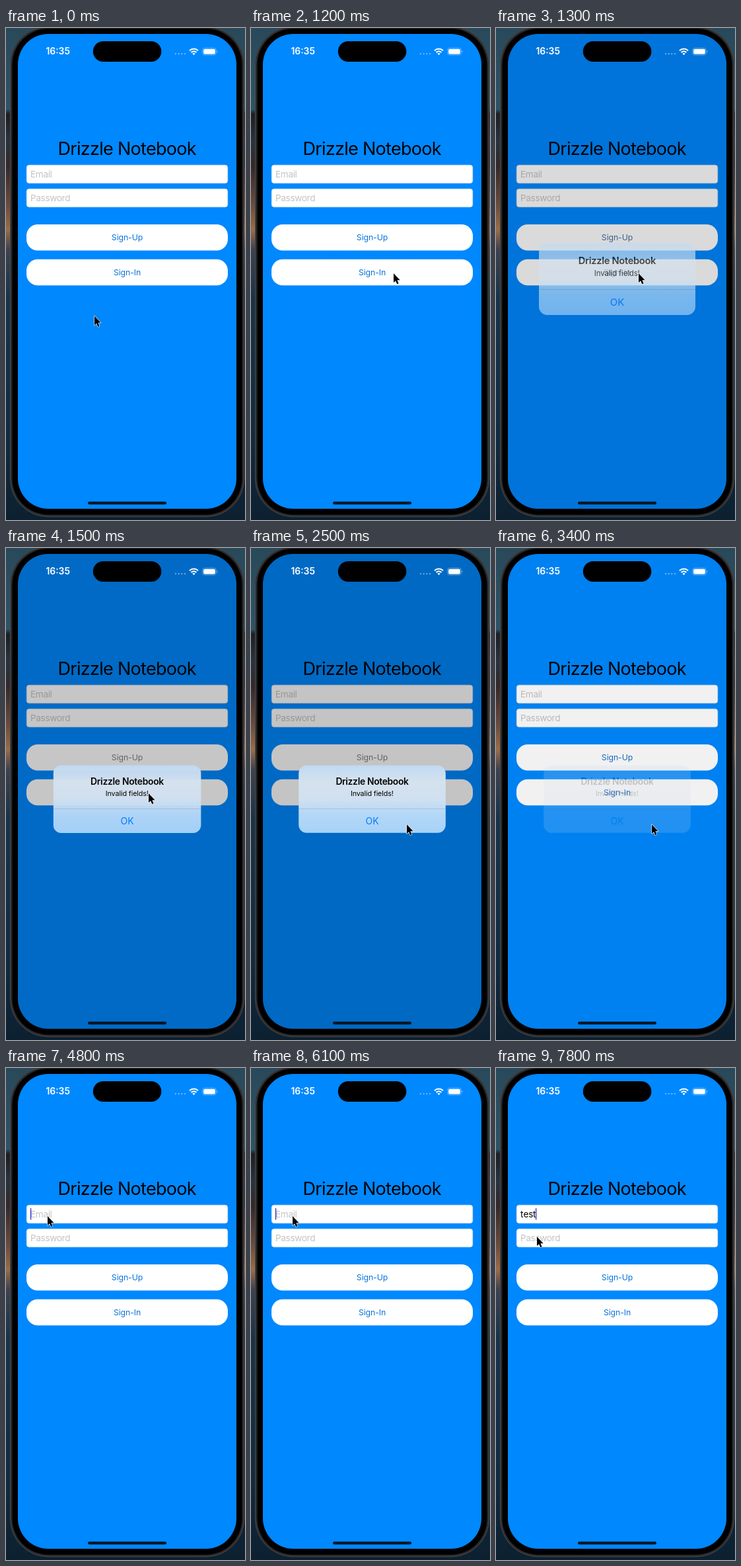
These frames come from a looping animation (362x744 px, 8 s). An HTML page:

```html
<!DOCTYPE html>
<html lang="en">
<head>
<meta charset="utf-8">
<title>Sign in</title>
<style>
  html, body { margin: 0; width: 100%; height: 100%; overflow: hidden; background: #10222f; }
  svg { display: block; width: 362px; height: 744px; font-family: Inter, "Liberation Sans", sans-serif; }
  .mid { text-anchor: middle; }
  .title { font-size: 27px; letter-spacing: -.7px; }
  .input { font-size: 13.6px; letter-spacing: -.35px; }
  .hint { fill: #c3c3c6; }
  .button { font-size: 12.3px; letter-spacing: -.1px; }
  .head { font-size: 13.8px; font-weight: 600; letter-spacing: -.3px; }
  .note { font-size: 10.8px; letter-spacing: -.15px; }
  .ok { font-size: 14px; fill: #0a7aff; }

  /* 1% = 80 ms */
  .anim { animation: 8s linear infinite; }
  .dim { animation-name: dim; }
  .tint { animation-name: tint; }
  .alert { animation-name: alert; transform-origin: 183.5px 379.7px; }
  .pointer { animation-name: move; animation-timing-function: ease-in-out; }
  .shown { animation-name: hide; animation-timing-function: step-end; }
  .email { animation-name: clear; animation-timing-function: step-end; }
  .k1, .k2, .k3, .k4 { animation-timing-function: step-end; }
  .k1 { animation-name: k1; }
  .k2 { animation-name: k2; }
  .k3 { animation-name: k3; }
  .k4 { animation-name: k4; }
  .blink { animation-name: blink; }
  .advance { animation-name: advance; animation-timing-function: step-end; }

  @keyframes dim {
    0%, 15% { opacity: 0; }
    16.25% { opacity: .145; }
    17.5% { opacity: .2; }
    18.75% { opacity: .222; }
    20%, 40% { opacity: .23; }
    41.25% { opacity: .135; }
    42.5% { opacity: .055; }
    43.75% { opacity: .017; }
    45%, 100% { opacity: 0; }
  }
  @keyframes tint {
    0%, 15% { fill: #0b74dc; }
    16.25% { fill: #4772a6; }
    18.75%, 40% { fill: #818181; }
    42.5% { fill: #1f70cb; }
    45%, 100% { fill: #0b74dc; }
  }
  @keyframes alert {
    0%, 15% { opacity: 0; transform: scale(1.2); }
    16.25% { opacity: .68; transform: scale(1.065); }
    17.5% { opacity: .9; transform: scale(1.02); }
    18.75% { opacity: .98; transform: scale(1.005); }
    20%, 40% { opacity: 1; transform: none; }
    41.25% { opacity: .55; }
    42.5% { opacity: .2; }
    43.75% { opacity: .06; }
    45%, 100% { opacity: 0; transform: none; }
  }
  @keyframes move {
    0%, 4% { transform: translate(134px, 435.5px); }
    15%, 26.5% { transform: translate(216px, 371px); }
    31%, 45% { transform: translate(236px, 418px); }
    51.25%, 91% { transform: translate(63px, 224px); }
    97%, 100% { transform: translate(62px, 255px); }
  }
  @keyframes hide { 0% { opacity: 1; } 80% { opacity: 0; } 91.25%, 100% { opacity: 1; } }
  @keyframes clear { 0% { opacity: 1; } 80%, 100% { opacity: 0; } }
  @keyframes k1 { 0% { opacity: 0; } 80%, 100% { opacity: 1; } }
  @keyframes k2 { 0% { opacity: 0; } 81.25%, 100% { opacity: 1; } }
  @keyframes k3 { 0% { opacity: 0; } 83.75%, 100% { opacity: 1; } }
  @keyframes k4 { 0% { opacity: 0; } 85%, 100% { opacity: 1; } }
  @keyframes blink {
    0%, 59.99% { opacity: 0; }
    60%, 69.5% { opacity: 1; }
    71.25%, 74.5% { opacity: 0; }
    76.25%, 90.5% { opacity: 1; }
    92.5%, 95.5% { opacity: 0; }
    97.5%, 100% { opacity: 1; }
  }
  @keyframes advance {
    0% { transform: none; }
    80% { transform: translateX(4.7px); }
    81.25% { transform: translateX(12.3px); }
    83.75% { transform: translateX(19.1px); }
    85%, 100% { transform: translateX(23.2px); }
  }
</style>
</head>
<body>
<svg viewBox="0 0 362 744">
  <defs>
    <linearGradient id="dusk" x2="0" y2="1">
      <stop offset="0" stop-color="#29495a"/>
      <stop offset=".165" stop-color="#2c5468"/>
      <stop offset=".175" stop-color="#1c1e24"/>
      <stop offset=".23" stop-color="#283440"/>
      <stop offset=".28" stop-color="#33282a"/>
      <stop offset=".36" stop-color="#6c4c3c"/>
      <stop offset=".41" stop-color="#9a6c48"/>
      <stop offset=".45" stop-color="#3e4250"/>
      <stop offset=".55" stop-color="#17344a"/>
      <stop offset=".82" stop-color="#112c42"/>
      <stop offset="1" stop-color="#0c2030"/>
    </linearGradient>
    <linearGradient id="glass" x2="0" y2="1">
      <stop offset="0" stop-color="#c0daf2"/>
      <stop offset=".25" stop-color="#d5e2ee"/>
      <stop offset=".5" stop-color="#d0e0f0"/>
      <stop offset=".72" stop-color="#b4d8f7"/>
      <stop offset="1" stop-color="#a6d2f8"/>
    </linearGradient>
    <clipPath id="screen"><rect x="18" y="9" width="331" height="718" rx="46"/></clipPath>
  </defs>

  <rect width="362" height="744" fill="url(#dusk)"/>
  <rect x="6" y="-2.5" width="355" height="742" rx="58" fill="#29292b"/>
  <rect x="6.5" y="-2" width="354" height="741" rx="57.5" fill="none" stroke="#4b4b4e"/>
  <rect x="9.5" y="1" width="348" height="735" rx="54.5"/>

  <g clip-path="url(#screen)">
    <rect x="18" y="9" width="331" height="718" fill="#08f"/>
    <text class="mid title" x="183.2" y="192">Drizzle Notebook</text>

    <g fill="#fff" stroke="#d5d9de" stroke-width=".6">
      <rect x="31.2" y="207.2" width="304.6" height="27.6" rx="4"/>
      <rect x="31.2" y="243.2" width="304.6" height="27.6" rx="4"/>
    </g>
    <text class="input hint anim email" x="37" y="226">Email</text>
    <text class="input hint" x="37" y="262">Password</text>
    <text class="input" x="37" y="226"><tspan class="anim k1" id="key"></tspan></text>

    <g fill="#fff">
      <rect x="31" y="297" width="305" height="39.5" rx="17"/>
      <rect x="31" y="349.7" width="305" height="39.5" rx="17"/>
    </g>
    <g class="mid button anim tint">
      <text x="183.5" y="321.4">Sign-Up</text>
      <text x="183.5" y="374">Sign-In</text>
    </g>
    <g class="input">
      <text class="anim k1" x="37" y="226">t</text>
      <text class="anim k2" x="41.6" y="226">e</text>
      <text class="anim k3" x="49.2" y="226">s</text>
      <text class="anim k4" x="56.1" y="226">t</text>
    </g>
    <g class="anim blink">
      <rect class="anim advance" x="36.7" y="212" width="1.6" height="17.5" rx=".6" fill="#4a48d2"/>
    </g>

    <rect class="anim dim" x="18" y="9" width="331" height="718"/>

    <g class="anim alert">
      <rect x="72.2" y="328.8" width="222.6" height="102" rx="12" fill="url(#glass)"/>
      <rect x="72.2" y="394" width="222.6" height=".7" fill="#3c4a60" opacity=".25"/>
      <g class="mid">
        <text class="head" x="183.5" y="358.2">Drizzle Notebook</text>
        <text class="note" x="183.3" y="375">Invalid fields!</text>
        <text class="ok" x="183.5" y="418">OK</text>
      </g>
    </g>
  </g>

  <!-- status bar -->
  <rect x="131.8" y="20" width="103.5" height="31" rx="15.5"/>
  <g fill="#fff">
    <text class="mid" x="78.7" y="40.4" font-size="13.9" font-weight="600">16:35</text>
    <g opacity=".4">
      <circle cx="257" cy="39" r="1.2"/>
      <circle cx="261.7" cy="39" r="1.2"/>
      <circle cx="266.3" cy="39" r="1.2"/>
      <circle cx="271" cy="39" r="1.2"/>
    </g>
    <g fill="none" stroke="#fff" stroke-width="2.1">
      <path d="M278 34.2a9.2 9.2 0 0 1 13 0"/>
      <path d="M280.6 36.9a5.6 5.6 0 0 1 7.8 0"/>
    </g>
    <path d="M284.5 41l-2.1-2.2a3 3 0 0 1 4.2 0z"/>
    <rect x="297.5" y="30.3" width="21" height="10.6" rx="3.4" fill="none" stroke="#fff" stroke-width=".8" opacity=".45"/>
    <rect x="299" y="31.8" width="18" height="7.6" rx="2.2"/>
    <path d="M319.6 34v3.4a1.9 1.9 0 0 0 0-3.4z" opacity=".5"/>
  </g>
  <rect x="124" y="716.3" width="119" height="4.2" rx="2.1" fill="#0c1420"/>

  <g class="anim shown">
    <path class="anim pointer" d="M0 0V14L3.1 11.2 5.3 16.2 7.6 15.2 5.4 10.3H9.7Z" stroke="#fff" stroke-width="1.2" stroke-linejoin="round" paint-order="stroke"/>
  </g>
</svg>
</body>
</html>
```
